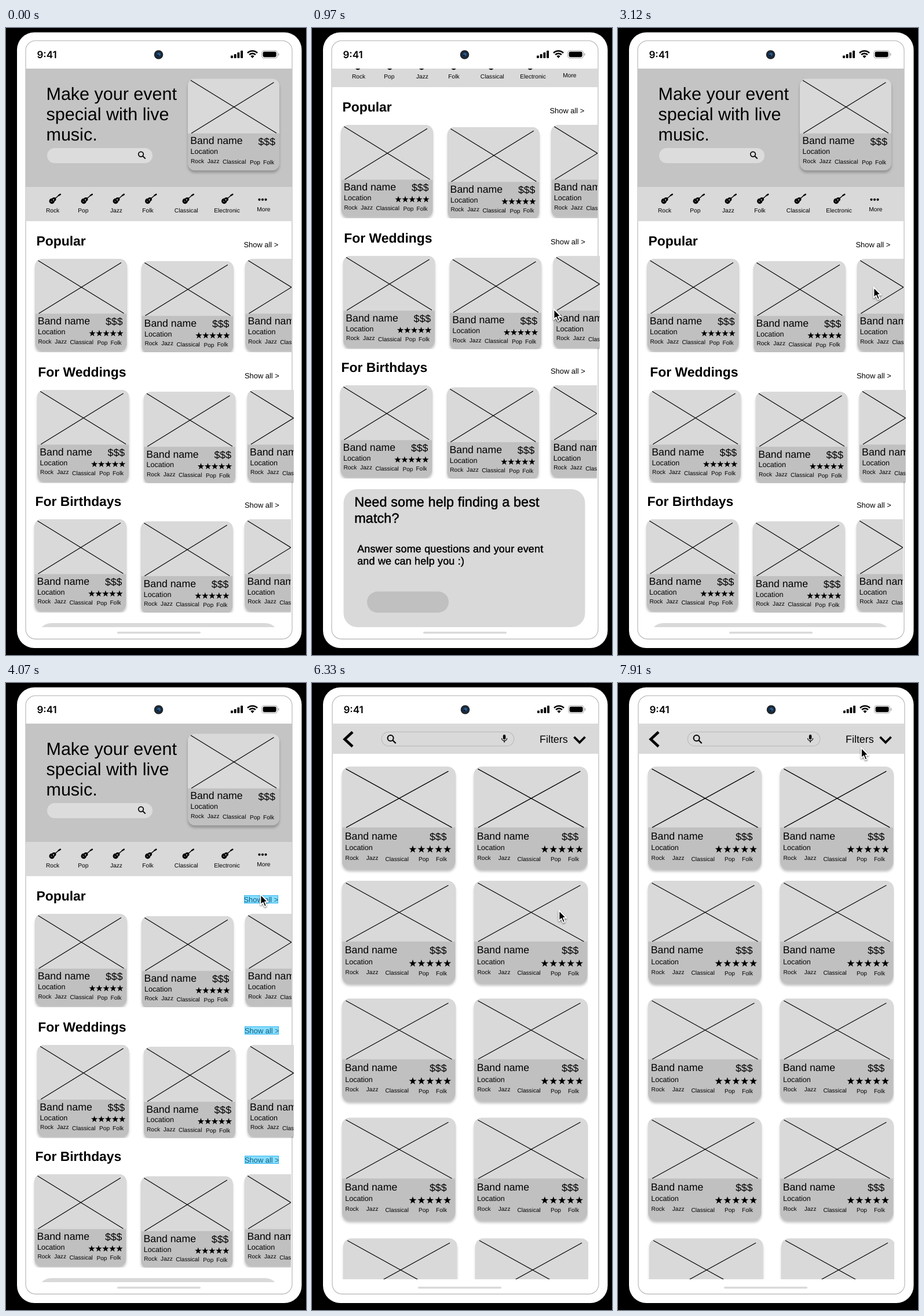
Animation, 518 px wide and 1081 px high, one loop 7990 ms. Source, as an HTML page with a canvas:

```html
<!DOCTYPE html>
<html lang="en">
<head>
<meta charset="utf-8">
<title>Band booking wireframe</title>
<style>
html, body { margin: 0; width: 100%; height: 100%; overflow: hidden; background: #000; }
canvas { display: block; width: 518px; height: 1081px; }
</style>
</head>
<body>
<canvas id="stage" width="518" height="1081"></canvas>
<script>
const ctx = document.getElementById('stage').getContext('2d');
ctx.textRendering = 'geometricPrecision';
const LOOP = 7990;
const SANS = '"Liberation Sans", Arial, sans-serif';
const LIGHT = '#d9d9d9', MID = '#c4c4c4', DARK = '#c0c0c0';
const GENRES = ['Rock', 'Jazz', 'Classical', 'Pop', 'Folk'];

// [time, value...] lists: each entry holds until the next one
const HOME_SCROLL = [[0, 0], [820, 70], [890, 180], [970, 231], [2460, 131], [2540, 0]];
const LIST_SCROLL = [[0, 0], [6720, 60], [6790, 113.5], [7290, 50], [7360, 0]];
const POINTER = [
  [0], [330, 419, 496], [410, 417.5, 484.5], [2790], [3820, 439.5, 364.5],
  [4930, 440, 368, true], [6330, 426.5, 392], [6410, 375, 470], [6480, 320, 545],
  [7680, 340, 500], [7760, 385, 350], [7830, 412, 190], [7910, 420, 111.5]
];

const HOME_CARD = {
  w: 158, h: 158, split: 94.3, radius: 12,
  cross: [[5, 2.7, 153, 93.7], [6, 93.9, 148.5, 6.2]],
  name: [4.2, 112.9], price: [121.5, 114], place: [4.5, 129.7],
  stars: [98.5, 128.3, 12, 6],
  genres: [5, 33.8, 60, 107, 130], base: 145.2, drop: [0, 0, 1.4, 2.3, 2]
};
const LIST_CARD = {
  w: 195.5, h: 176.5, split: 104.5, radius: 13,
  cross: [[6.5, 3.5, 189.5, 104.5], [7, 104.5, 183.5, 7.5]],
  name: [4.8, 125], price: [151, 126], place: [5.2, 143.6],
  stars: [122, 142.3, 14.9, 6.8],
  genres: [5.6, 41.8, 74.5, 132, 162], base: 160.2, drop: [0, 0, 1.7, 2.5, 2.5]
};

function held(list, t) {
  let row = list[0];
  for (const r of list) if (t >= r[0]) row = r;
  return row;
}

// Progress 0..1 in ten equal hard steps over 700 ms
function tenSteps(t, start) {
  return Math.min(9, Math.floor((t - start) * 9 / 700 + 0.01)) / 9;
}

function rect(x, y, w, h, color) {
  ctx.fillStyle = color;
  ctx.fillRect(x, y, w, h);
}

function pill(x, y, w, h, r, color) {
  ctx.beginPath();
  ctx.roundRect(x, y, w, h, r);
  ctx.fillStyle = color;
  ctx.fill();
}

function dot(x, y, r, color = '#000') {
  ctx.beginPath();
  ctx.arc(x, y, r, 0, Math.PI * 2);
  ctx.fillStyle = color;
  ctx.fill();
}

function line(points, width, color = '#000', cap = 'butt') {
  ctx.beginPath();
  for (let i = 0; i < points.length; i += 2) ctx.lineTo(points[i], points[i + 1]);
  ctx.lineWidth = width;
  ctx.strokeStyle = color;
  ctx.lineCap = cap;
  ctx.stroke();
}

function text(str, x, y, size, weight = 400, family = SANS) {
  ctx.font = `${weight} ${size}px ${family}`;
  ctx.fillStyle = '#000';
  ctx.fillText(str, x, y);
}

// Regular text thickened to a medium weight
function mediumText(str, x, y, size, spacing) {
  ctx.letterSpacing = spacing + 'px';
  text(str, x, y, size);
  ctx.lineWidth = 0.5;
  ctx.strokeStyle = '#000';
  ctx.strokeText(str, x, y);
  ctx.letterSpacing = '0px';
}

function clipped(x, y, w, h, draw) {
  ctx.save();
  ctx.beginPath();
  ctx.rect(x, y, w, h);
  ctx.clip();
  draw();
  ctx.restore();
}

function star(x, y, r) {
  ctx.beginPath();
  for (let i = 0; i < 10; i++) {
    const a = -Math.PI / 2 + i * Math.PI / 5, d = i % 2 ? r * 0.4 : r;
    ctx.lineTo(x + d * Math.cos(a), y + d * Math.sin(a));
  }
  ctx.fillStyle = '#000';
  ctx.fill();
}

function card(x, y, c, rated = true) {
  ctx.save();
  ctx.translate(x, y);
  ctx.save();
  ctx.shadowColor = 'rgba(0,0,0,.25)';
  ctx.shadowBlur = 4;
  ctx.shadowOffsetY = 4;
  pill(0, 0, c.w, c.h, c.radius, DARK);
  ctx.restore();
  pill(0, 0, c.w, c.split, [c.radius, c.radius, 0, 0], LIGHT);
  for (const l of c.cross) line(l, 1.2);
  text('Band name', ...c.name, 17.7);
  text('$$$', ...c.price, 17.7);
  text('Location', ...c.place, 12.6);
  GENRES.forEach((g, i) => text(g, c.genres[i], c.base + c.drop[i], 10.1));
  if (rated) {
    const [sx, sy, step, r] = c.stars;
    for (let i = 0; i < 5; i++) star(sx + i * step, sy, r);
  }
  ctx.restore();
}

function lens(x, y, r, width) {
  ctx.beginPath();
  ctx.arc(x, y, r, 0, Math.PI * 2);
  ctx.lineWidth = width;
  ctx.strokeStyle = '#000';
  ctx.stroke();
  line([x + r * 0.7, y + r * 0.7, x + r * 1.8, y + r * 1.8], width * 1.15);
}

function guitar(x, y) {
  dot(x + 5.2, y + 13, 4.7);
  dot(x + 9, y + 9.8, 3.4);
  line([x + 9, y + 10, x + 17.5, y + 2.8], 1.5);
  line([x + 16.8, y + 3.2, x + 19.8, y + 1.4], 2.5, '#000', 'round');
  dot(x + 8, y + 10.8, 1.1, LIGHT);
  line([x + 3.4, y + 12.4, x + 5.6, y + 14.6], 0.9, LIGHT);
}

function phone(dx) {
  rect(0, 0, 518, 1081, '#000');
  pill(19, 7.5, 491.5, 1061.5, 30, '#fff');
  ctx.beginPath();
  ctx.roundRect(34 + dx, 21.8, 460, 1031.7, 17);
  ctx.lineWidth = 1.3;
  ctx.strokeStyle = '#bdbdbd';
  ctx.stroke();
  ctx.save();
  ctx.translate(dx, 0);
  statusBar();
  ctx.restore();
}

function statusBar() {
  text('9:41', 53.5, 52, 17, 600, 'Inter, sans-serif');
  dot(263.5, 46, 7.8, '#20262b');
  dot(263.5, 46, 5, '#152f4d');
  dot(264, 45.5, 2.8, '#2b5c8c');
  dot(262.5, 47.3, 1.4, '#0c1626');
  [4.5, 7, 10, 13].forEach((h, i) => pill(388 + i * 5.7, 52 - h, 3.9, h, 1, '#000'));
  for (const r of [12, 7.6]) {
    ctx.beginPath();
    ctx.arc(425.5, 51.5, r, -Math.PI * 0.75, -Math.PI * 0.25);
    ctx.lineWidth = 2.7;
    ctx.strokeStyle = '#000';
    ctx.lineCap = 'butt';
    ctx.stroke();
  }
  ctx.beginPath();
  ctx.moveTo(425.5, 52);
  ctx.arc(425.5, 51.5, 4.3, -Math.PI * 0.75, -Math.PI * 0.25);
  ctx.fillStyle = '#000';
  ctx.fill();
  ctx.beginPath();
  ctx.roundRect(441.8, 39, 26.6, 13, 4);
  ctx.lineWidth = 1.1;
  ctx.strokeStyle = '#a6a6a6';
  ctx.stroke();
  pill(443.6, 40.8, 23, 9.4, 2.4, '#000');
  pill(469.8, 43.3, 1.6, 4.4, 1, '#a6a6a6');
}

function hero() {
  rect(34, 70, 460, 204, MID);
  ['Make your event', 'special with live', 'music.'].forEach((s, i) =>
    text(s, 69.5, 123.7 + i * 35.3, 30.5));
  pill(71, 207, 182, 26, 13, '#dcdcdc');
  lens(233, 217.6, 4.3, 1.7);
  card(314, 87.5, HOME_CARD, false);
}

function categories() {
  rect(34, 274, 460, 59, LIGHT);
  const items = [['Rock', 69, 74], ['Pop', 124.3, 129], ['Jazz', 180, 184], ['Folk', 235.3, 239.5],
    ['Classical', 290.8, 304], ['Electronic', 359.2, 371.5]];
  for (const [label, x, icon] of items) {
    text(label, x, 318.2, 10.2);
    guitar(icon, 285.5);
  }
  for (const x of [437.5, 443, 448.5]) dot(x, 295.8, 2.1);
  text('More', 433.3, 315.8, 10.2);
}

const ROWS = [
  ['Popular', 52.5, 375.2, 0, 0, 410.5],
  ['For Weddings', 55.3, 600.8, 3.6, 225.6, 412],
  ['For Birthdays', 50.5, 823.8, -1.1, 448.8, 412]
];

function bandRow([title, x, base, dx, dy, linkX]) {
  text(title, x, base, 22.9, 700);
  text('Show all >', linkX, 378 + dy, 12.9);
  clipped(40, 390 + dy, 453 + dx, 169, () => {
    card(50.5 + dx, 398.3 + dy, HOME_CARD);
    card(234.4 + dx, 402 + dy, HOME_CARD);
    card(413.3 + dx, 398.3 + dy, HOME_CARD);
  });
}

function hints(alpha) {
  ctx.globalAlpha = alpha;
  for (const [, , , , dy, x] of ROWS) {
    const left = Math.round(x), top = 366 + Math.round(dy);
    rect(left, top, 59, 14, 'rgba(20,190,255,.5)');
    ctx.lineWidth = 1;
    ctx.strokeStyle = 'rgba(30,174,238,.85)';
    ctx.strokeRect(left + 0.5, top + 0.5, 58, 13);
  }
  ctx.globalAlpha = 1;
}

function helpCard() {
  pill(54.5, 1026, 417, 238, 24, LIGHT);
  mediumText('Need some help finding a best', 73.2, 1056.2, 23.4, 0.12);
  mediumText('match?', 73.2, 1084.2, 23.4, 0.12);
  mediumText('Answer some questions and your event', 78.2, 1134.7, 17.9, 0.22);
  mediumText('and we can help you :)', 78.2, 1155.9, 17.9, 0.22);
  pill(95, 1202.5, 141, 36.5, 18.2, DARK);
}

function homePage(t) {
  phone(0);
  clipped(34, 70, 463, 963, () => {
    ctx.translate(0, -held(HOME_SCROLL, t)[1]);
    hero();
    categories();
    ROWS.forEach(bandRow);
    helpCard();
    if (t >= 4070 && t < 4770) hints(1 - tenSteps(t, 4070));
  });
  pill(192, 1040.8, 144, 3.4, 1.7, LIGHT);
}

function listHeader() {
  rect(35, 70, 460, 52, LIGHT);
  line([70, 84.5, 56.5, 97, 70, 109.5], 4.6);
  ctx.beginPath();
  ctx.roundRect(120.3, 84.3, 228.5, 24.4, 12.2);
  ctx.lineWidth = 1.2;
  ctx.strokeStyle = '#bcbcbc';
  ctx.stroke();
  lens(135.6, 95, 5, 2);
  pill(329.9, 89, 4.4, 8.4, 2.2, '#000');
  ctx.beginPath();
  ctx.arc(332.1, 95.2, 4.5, 0, Math.PI);
  ctx.lineWidth = 1.3;
  ctx.strokeStyle = '#000';
  ctx.stroke();
  line([332.1, 99.5, 332.1, 102.5], 1.5);
  text('Filters', 393, 103.2, 17.9);
  line([452.5, 93, 462, 102.5, 471.5, 93], 3.8);
}

function listPage(t) {
  phone(1);
  listHeader();
  clipped(46, 144, 431, 884, () => {
    ctx.translate(0, -held(LIST_SCROLL, t)[1]);
    [144.6, 341.3, 544.2, 749.7, 957.8].forEach((y, i) => {
      const x = i === 4 ? 54.6 : 52;
      card(x, y, LIST_CARD);
      card(x + 227.9, y, LIST_CARD);
    });
  });
  pill(183, 1040.8, 144, 3.4, 1.7, LIGHT);
}

function arrow() {
  const p = [0, 0, 0, 18, 4.2, 14.2, 7, 21, 10.3, 19.6, 7.4, 13, 12.8, 13];
  const path = new Path2D();
  for (let i = 0; i < p.length; i += 2) path.lineTo(p[i], p[i + 1]);
  path.closePath();
  ctx.fillStyle = '#000';
  ctx.fill(path);
  ctx.lineWidth = 1.8;
  ctx.lineJoin = 'round';
  ctx.strokeStyle = '#fff';
  ctx.stroke(path);
}

function hand() {
  const path = new Path2D();
  path.roundRect(-2.2, 2.5, 4.6, 15, 2.3);
  for (let i = 0; i < 3; i++) path.roundRect(2 + i * 3.8, 8.5 + i * 0.8, 4.3, 9, 2.1);
  path.moveTo(-2.2, 13.5);
  path.bezierCurveTo(-5, 10.5, -8.5, 12, -6, 15);
  path.lineTo(-1, 22);
  path.lineTo(-0.5, 24.5);
  path.lineTo(10.5, 24.5);
  path.quadraticCurveTo(13.9, 20, 13.9, 13.5);
  path.closePath();
  ctx.lineWidth = 2.4;
  ctx.lineJoin = 'round';
  ctx.strokeStyle = '#000';
  ctx.stroke(path);
  ctx.shadowColor = 'transparent';
  ctx.fillStyle = '#fff';
  ctx.fill(path);
  for (const x of [2.6, 6, 9.6]) line([x, 15.5, x, 21], 1.1);
}

function pointer(t) {
  let [, x, y, linked] = held(POINTER, t);
  if (t >= 3120 && t < 3820) {
    const p = tenSteps(t, 3120), e = 1 - (1 - p) ** 2;
    x = 441.5 - 2 * e;
    y = 447 - 82.5 * e;
    linked = y > 366 && y < 380;
  }
  if (x === undefined) return;
  ctx.save();
  ctx.translate(x, y);
  ctx.shadowColor = 'rgba(0,0,0,.4)';
  ctx.shadowBlur = 3;
  ctx.shadowOffsetY = 1.5;
  if (linked) hand(); else arrow();
  ctx.restore();
}

const start = performance.now();
function frame() {
  const t = (performance.now() - start) % LOOP;
  if (t < 5420) homePage(t); else listPage(t);
  pointer(t);
  requestAnimationFrame(frame);
}
frame();
</script>
</body>
</html>
```
